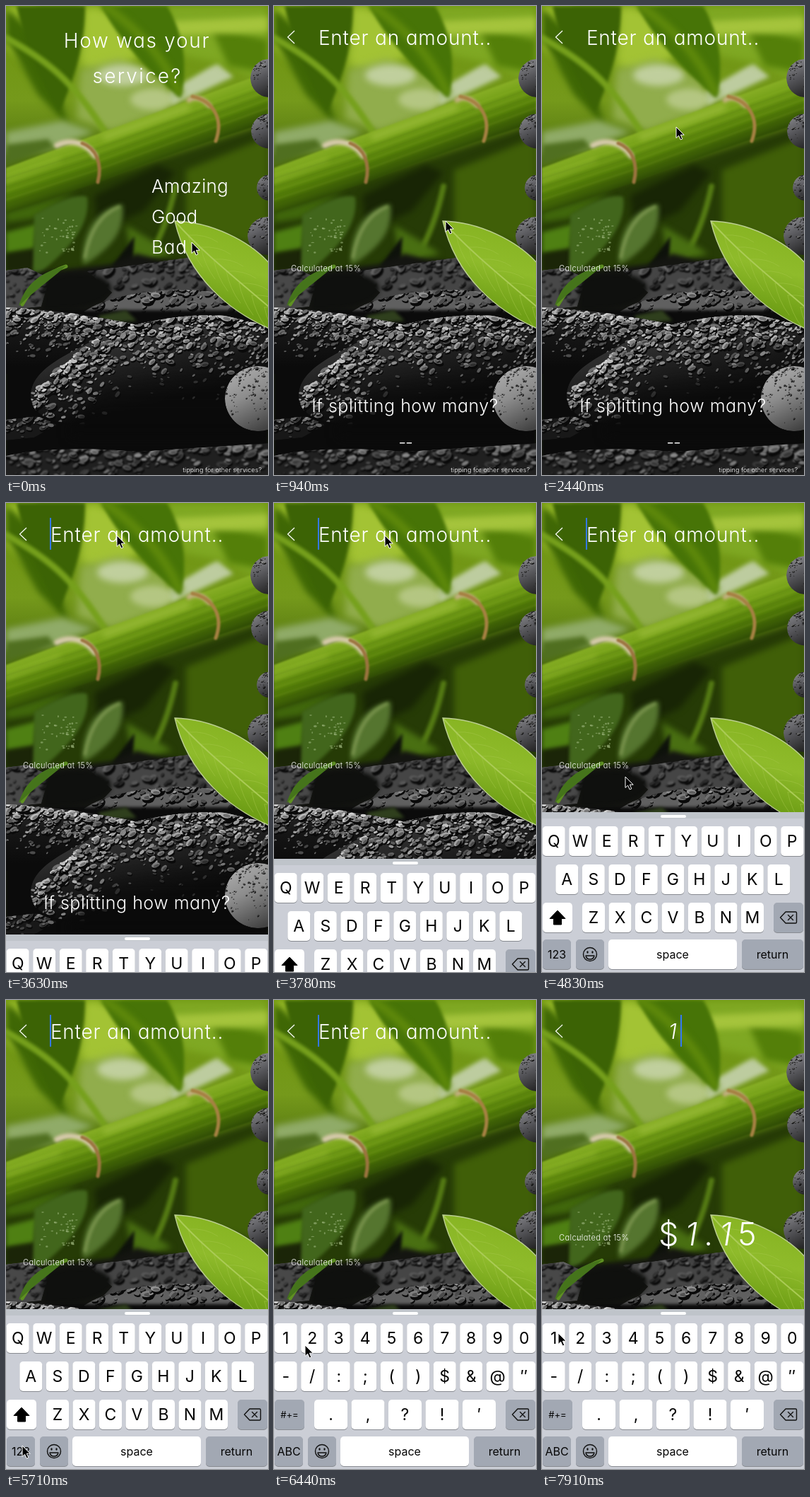
These frames come from a looping animation (371 px wide and 663 px high, 8000 ms). An HTML page with a canvas:

```html
<!DOCTYPE html>
<html lang="en">
<head>
<meta charset="utf-8">
<title>Tip calculator</title>
<style>
html, body { margin: 0; width: 100%; height: 100%; overflow: hidden; background: #0b0b0b; }
canvas, svg { position: absolute; left: 0; top: 0; width: 371px; height: 663px; }
text { font-family: Inter, "Open Sans", sans-serif; white-space: pre; }
.ui { fill: #fff; font-weight: 300; font-feature-settings: "cv11"; }
.key { fill: #050505; text-anchor: middle; }
</style>
</head>
<body>
<canvas id="photo" width="371" height="663"></canvas>
<svg id="stage" viewBox="0 0 371 663"></svg>
<script>
const W = 371, H = 663, LOOP = 8000;

/* ---------- backdrop ---------- */
const ctx = document.getElementById('photo').getContext('2d');
let seed = 7;
const rnd = (a = 0, b = 1) => {
  seed = (seed * 16807) % 2147483647;
  return a + (b - a) * seed / 2147483647;
};

function fade(x0, y0, x1, y1, ...colors) {
  const g = ctx.createLinearGradient(x0, y0, x1, y1);
  colors.forEach((c, i) => g.addColorStop(i / (colors.length - 1), c));
  return g;
}
function shape(fill, d, blur = 0) {
  ctx.filter = blur ? `blur(${blur}px)` : 'none';
  ctx.fillStyle = fill;
  ctx.fill(new Path2D(d));
  ctx.filter = 'none';
}
function line(color, width, d, blur = 0) {
  ctx.filter = blur ? `blur(${blur}px)` : 'none';
  ctx.strokeStyle = color;
  ctx.lineWidth = width;
  ctx.lineCap = 'round';
  ctx.stroke(new Path2D(d));
  ctx.filter = 'none';
}
const disc = (x, y, rx, ry = rx) =>
  `M${x - rx} ${y}a${rx} ${ry} 0 1 0 ${2 * rx} 0a${rx} ${ry} 0 1 0 ${-2 * rx} 0Z`;

function blob(v, x, y, rx, ry, angle) {
  ctx.fillStyle = `rgb(${v},${v},${v})`;
  ctx.beginPath();
  ctx.ellipse(x, y, rx, ry, angle, 0, 7);
  ctx.fill();
}

// Wet stone: drops start at the crest and get smaller, rarer and darker below it.
function stone(fill, d, { from, to, crest, depth, count, size, bright, soft = 0 }) {
  ctx.save();
  ctx.clip(new Path2D(d));
  shape(fill, d);
  if (soft) ctx.filter = `blur(${soft}px)`;
  for (let i = 0; i < count; i++) {
    const k = rnd() * rnd(), x = rnd(from, to), y = crest(x) + k * depth;
    const r = size * (.25 + .75 * rnd() * rnd()) * (1 - k * .4);
    const v = bright * (1 - k * .65) * rnd(.45, 1), angle = rnd(-1, .3);
    blob(10, x + r * .3, y + r * .55, r * 1.25, r * .75, angle);
    blob(v, x, y, r * 1.2, r * .65, angle);
    if (r > size * .5) blob(v * .65, x + r * .2, y + r * .15, r * .8, r * .35, angle);
  }
  ctx.restore();
}

function foliage() {
  ctx.fillStyle = fade(0, 0, 0, 400, '#6d930d', '#75991b', '#3b5a08', '#1b2d06');
  ctx.fillRect(0, 0, W, H);
  shape('#95b827', 'M0 0H40L75 55L45 100L0 60Z', 5);
  shape('#3f6705', 'M0 5C45 35 70 85 88 170L45 125L0 45Z', 4);
  shape('#a3c334', 'M108 0H160L195 65L150 100L104 85Z', 7);
  shape('#91ad4c', 'M105 90L160 75L230 105L225 150L150 178L100 160Z', 6);
  shape('#c0cf9d', disc(165, 98, 36, 15), 5);
  shape('#b4c682', disc(208, 132, 32, 15), 4);
  shape('#bdcc9f', 'M232 120L300 80L322 100L275 122L235 140Z', 3);
  shape('#7fa823', 'M225 0H371V110L300 80L250 70Z', 6);
  shape('#547f09', 'M290 30L371 48V95L315 85Z', 5);
  shape('#a5c43c', 'M228 22L371 15V36L232 42Z', 4);
  shape('#3c6305', 'M15 0H112C112 55 97 105 75 150C48 105 28 60 15 0Z', 2);
  shape('#477407', 'M135 0H228C252 40 258 85 247 130C205 95 160 50 135 0Z', 2);
  line('#5f890b', 12, 'M140 0C190 35 225 75 245 122', 4);
  line('#76a01c', 9, 'M0 45C55 75 95 105 140 178', 2);
  shape('#90ab68', 'M0 178L80 162L125 178L60 203L0 208Z', 5);
  shape('#506f20', 'M0 196L60 188L68 200L0 225Z', 3);

  shape('#263b06', 'M0 290L371 165V380H0Z', 5);
  shape('#405f08', 'M255 232L371 185V345L255 310Z', 5);
  shape('#182505', 'M125 268L215 225L240 235L195 290L130 320Z', 5);
  shape('#41680c', 'M0 292L100 262L40 300L0 306Z', 4);
  shape('#4f8013', 'M0 320L45 308L40 345L0 350Z', 3);
  shape('#1b2508', 'M0 350L45 342L40 375H0Z', 3);
  shape('#42661c', 'M40 295C75 275 100 265 115 270C120 310 90 345 38 385Z', 2);
  shape('#55752f', 'M108 358C110 310 135 285 165 280C170 320 145 345 110 366Z', 3);
  line('#7f9852', 4, 'M112 355C120 310 140 292 160 284', 2);
  for (let i = 0; i < 45; i++)
    shape('rgba(165,190,135,.55)', disc(rnd(48, 100), rnd(300, 350), rnd(.8, 2.5), rnd(.6, 1.6)));
  line('#557b14', 8, 'M205 350C220 325 232 292 240 255', 2);
  shape('#496f12', 'M170 310L212 335L235 350L180 365Z', 4);
  shape('#0e120b', 'M150 368L182 325L178 375Z', 2);

  const top = 'M0 229L75 201L371 93V165C290 190 210 218 130 249L0 292Z';
  shape(fade(150, 160, 176, 232, '#95b72f', '#78a31a', '#557f09', '#304d05'), top, 1);
  line('#a7c545', 5, 'M140 186L258 144', 4);
  line('#90b62d', 5, 'M0 245L75 217', 4);
  for (let i = 0; i < 8; i++)
    line(i % 2 ? 'rgba(50,80,0,.2)' : 'rgba(165,195,55,.18)', 1.5,
      `M0 ${238 + i * 6}L128 ${196 + i * 6}L371 ${108 + i * 6}`, 1);
  line('#d6caab', 8, 'M72 197C95 186 116 196 126 212', 2);
  line('#9c7440', 5, 'M108 194C127 201 137 222 130 249', 1);
  line('#c4b083', 7, 'M259 133C270 126 281 133 288 141', 2);
  line('#a68143', 5, 'M264 128C292 134 309 158 297 191', 1);
}

function rocks() {
  shape('#141511', 'M0 382L150 365L185 350L215 358L371 375V663H0Z', 3);
  stone('#484848', 'M0 374L30 370L62 385L50 425L0 430Z',
    { from: 0, to: 60, crest: () => 372, depth: 60, count: 60, size: 7, bright: 140, soft: 1 });
  stone('#454545', 'M115 375L215 362L262 355L310 372L371 400V448H110L150 405Z',
    { from: 115, to: 371, crest: () => 358, depth: 90, count: 190, size: 9, bright: 125, soft: 1 });
  stone('#606060', 'M110 432C150 405 240 395 300 405L355 435L300 446H130Z',
    { from: 110, to: 355, crest: () => 400, depth: 48, count: 150, size: 9, bright: 175, soft: .7 });
  shape('#0f100e', 'M55 388C90 372 140 376 148 395S115 432 52 428Z', 3);
  line('#5f9022', 5, 'M85 368C60 376 40 392 23 422', .7);
  shape('#45741b', 'M18 424C28 392 50 376 85 367C65 386 48 396 18 424Z');

  shape('#0b0b0b', 'M0 430H371V663H0Z', 2);
  shape('#2f3f1d', 'M130 438L170 430L185 445L140 448Z', 2);
  stone(fade(0, 425, 0, 510, '#2b2b2b', '#151515', '#0b0b0b'),
    'M0 426C60 428 130 438 190 452L185 500L60 530L0 520Z',
    { from: 0, to: 190, crest: x => 426 + x * .12, depth: 85, count: 480, size: 7, bright: 225 });
  const bulge = x => 438 + 112 * Math.max(0, 1 - (x - 35) / 170) ** 1.5;
  stone(fade(190, 440, 220, 560, '#3c3c3c', '#202020', '#0b0b0b'),
    'M35 552C34 520 70 500 110 480C170 446 250 434 310 438L371 452V545C290 575 180 598 90 590C55 586 36 574 35 552Z',
    { from: 35, to: 371, crest: bulge, depth: 125, count: 850, size: 8, bright: 225 });
  shape(fade(0, 490, 0, 600, 'rgba(10,10,10,0)', 'rgba(10,10,10,.9)'),
    'M90 595L140 535L371 500V610H90Z', 8);
  stone('#181818', 'M0 585L45 580L72 592L40 610L0 614Z',
    { from: 0, to: 70, crest: () => 582, depth: 30, count: 50, size: 8, bright: 150, soft: .7 });
  stone('#202020', 'M0 636C60 622 130 626 190 630L371 618V663H0Z',
    { from: 0, to: 371, crest: () => 622, depth: 70, count: 260, size: 10, bright: 160, soft: 1 });

  const ball = (x, y, rx, ry, ...tones) =>
    stone(fade(x - rx, y - ry, x, y + ry, ...tones), disc(x, y, rx, ry),
      { from: x - rx, to: x + rx, crest: () => y - ry, depth: 2 * ry, count: rx * 4, size: 2.6, bright: 185 });
  const dark = ['#929296', '#56565a', '#222'];
  ball(372, 102, 26, 27, ...dark);
  ball(374, 177, 27, 25, ...dark);
  ball(372, 257, 17, 18, ...dark);
  ball(370, 325, 28, 27, ...dark);
  ball(357, 555, 47, 46, '#b5b5b5', '#8c8c8c', '#444');
}

function leaf() {
  const d = 'M239 304C290 305 345 332 373 364V456C318 432 258 385 239 304Z';
  shape(fade(320, 310, 290, 420, '#86b321', '#8fbb2b', '#6f9f16'), d);
  ctx.save();
  ctx.clip(new Path2D(d));
  for (let i = 0; i < 7; i++) {
    const x = 258 + i * 18, y = 324 + i * 17;
    line('rgba(165,200,75,.5)', 1, `M${x} ${y}q25 -2 42 10M${x} ${y}q5 25 20 45`, .5);
  }
  line('#aacb55', 2, 'M240 305C275 345 325 385 373 426');
  ctx.restore();
  line('#bccf91', 1.4, d);
}

foliage();
rocks();
leaf();

/* ---------- interface ---------- */
const stage = document.getElementById('stage');
function add(parent, tag, attrs = {}, content = '') {
  const el = document.createElementNS('http://www.w3.org/2000/svg', tag);
  for (const k in attrs) el.setAttribute(k, attrs[k]);
  el.textContent = content;
  return parent.appendChild(el);
}
const group = parent => add(parent, 'g');
const label = (parent, str, x, y, size, gap = 0, anchor = 'start') => add(parent, 'text', {
  class: 'ui', x, y, 'font-size': size, 'letter-spacing': gap, 'text-anchor': anchor
}, str);

const ask = group(stage);
label(ask, 'How was your', 185.5, 59, 28, 1.7, 'middle');
label(ask, 'service?', 186, 109, 28, 2.2, 'middle');
label(ask, 'Amazing', 206, 264, 26, .3);
label(ask, 'Good', 206, 307, 26, -.2);
label(ask, 'Bad', 206, 350, 26, .8);

label(stage, 'tipping for other services?', 362, 659, 9, .1, 'end');

const form = group(stage);
add(form, 'path', { d: 'M29 35L19.5 44L29 53', fill: 'none', stroke: '#fff', 'stroke-width': 1.2 });
const hint = label(form, 'Enter an amount..', 185.5, 55, 28, .8, 'middle');
const typed = label(form, '1', 179, 55, 30);
typed.setAttribute('font-style', 'italic');
const rate = label(form, 'Calculated at 15%', 24, 375, 11, .4);
const total = label(form, '', 165, 347, 45, 9);
for (const ch of '$1.15')
  add(total, 'tspan', { 'font-style': ch === '1' ? 'italic' : 'normal' }, ch);
label(form, 'If splitting how many?', 185.5, 574, 25, .5, 'middle');
label(form, '--', 186, 625, 24, -1, 'middle');
const caret = add(form, 'rect', { y: 21, width: 2, height: 45, fill: '#3478f6' });

/* keyboard, laid out from its own top edge */
const board = group(stage);
add(board, 'rect', { width: W, height: 300, fill: '#cbced6' });
add(board, 'rect', { width: W, height: 9, fill: '#bfc4ca' });
add(board, 'rect', { x: 168, y: 4, width: 36, height: 4, rx: 2, fill: '#fff' });

function key(parent, x, y, w, str, size = 23, dark = false) {
  add(parent, 'rect', { x, y: y + 1, width: w, height: 42, rx: 5, fill: '#888b91' });
  add(parent, 'rect', { x, y, width: w, height: 42, rx: 5, fill: dark ? '#a2a8b3' : '#fff' });
  add(parent, 'text', { class: 'key', x: x + w / 2, y: y + 21 + size * .36, 'font-size': size }, str);
}
function row(parent, chars, x, y, w = 32, pitch = 37.5) {
  [...chars].forEach((c, i) => key(parent, x + i * pitch, y, w, c));
}
const ROWS = [20, 74, 128, 180];

const letters = group(board);
row(letters, 'QWERTYUIOP', .7, ROWS[0]);
row(letters, 'ASDFGHJKL', 19.3, ROWS[1]);
key(letters, 1, ROWS[2], 42, '');
add(letters, 'path', { d: 'M22 139L33 150.500H27.500V159H16.500V150.500H11Z', 'stroke-linejoin': 'round', stroke: '#000' });
row(letters, 'ZXCVBNM', 57, ROWS[2]);
key(letters, 1, ROWS[3], 40, '123', 16, true);

const digits = group(board);
row(digits, '1234567890', .7, ROWS[0]);
row(digits, '-/:;()$&@″', .7, ROWS[1]);
key(digits, 1, ROWS[2], 42, '#+=', 13, true);
row(digits, '.,?!′', 57, ROWS[2], 47, 52.5);
key(digits, 1, ROWS[3], 40, 'ABC', 16, true);

key(board, 328, ROWS[2], 42, '', 16, true);
const ink = { fill: 'none', stroke: '#111', 'stroke-width': 1.4, 'stroke-linejoin': 'round', 'stroke-linecap': 'round' };
add(board, 'path', { ...ink, d: 'M337.500 149L345 141H359Q360.500 141 360.500 142.500V155.500Q360.500 157 359 157H345ZM348.500 145.500L355.500 152.500M355.500 145.500L348.500 152.500' });
key(board, 48, ROWS[3], 40, '', 16, true);
add(board, 'path', { ...ink, d: disc(68, 201, 9.5) });
add(board, 'path', { ...ink, d: 'M62 203H74Q73 208 68 208T62 203Z' });
add(board, 'path', { d: disc(64.500, 198, 1.2, 1.8) + disc(71.500, 198, 1.2, 1.8), fill: '#111' });
key(board, 94, ROWS[3], 182, 'space', 16);
key(board, 283, ROWS[3], 87, 'return', 16, true);

const pointer = add(stage, 'path', {
  d: 'M0 0V15.500L3.600 12.200L6.200 18L8.800 16.900L6.300 11.200H11.200Z',
  fill: '#000', stroke: '#fff', 'stroke-width': 1
});

/* ---------- timeline: each entry holds until the next ---------- */
const tracks = {
  form: [[0, 0], [500, .25], [650, .6], [800, .9], [940, 1]],
  board: [[0, H], [3630, 610], [3780, 503], [3930, 450], [4080, 439], [4230, 438], [4380, 437]],
  digits: [[0, 0], [5860, 1]],
  caret: [[0, 0], [3630, 1], [4980, 0], [5430, 1], [5860, 0], [6300, 1], [6740, 0], [7170, 1]],
  typed: [[0, 0], [7320, 1]],
  rate: [[0, 375], [7470, 365], [7620, 350], [7760, 342], [7910, 340]],
  total: [[0, 0], [7470, .25], [7620, .6], [7760, .9], [7910, 1]],
  pointer: [
    [0, 263, 334], [500, 260, 330], [650, 252, 318], [800, 246, 308], [940, 243, 304],
    [2440, 190, 171], [2590, 170, 100], [2740, 160, 60], [2890, 157, 46],
    [4680, 145, 190], [4830, 118, 387], [4980, 102, 475], [5130, 82, 540], [5280, 60, 588],
    [5430, 40, 614], [5560, 28, 626], [5710, 23, 630], [5860, 23, 635],
    [6300, 38, 570], [6440, 44, 488], [6590, 29, 474], [6740, 23, 471]
  ]
};
const at = (name, t) => tracks[name].findLast(step => step[0] <= t).slice(1);
const show = (el, amount) => { el.style.opacity = amount; };

function draw(now) {
  const t = now % LOOP;
  const [open] = at('form', t), [top] = at('board', t), [numeric] = at('digits', t);
  const [isTyped] = at('typed', t);
  show(ask, 1 - open);
  show(form, open);
  show(letters, 1 - numeric);
  show(digits, numeric);
  show(hint, 1 - isTyped);
  show(typed, isTyped);
  show(caret, at('caret', t)[0]);
  show(total, at('total', t)[0]);
  caret.setAttribute('x', isTyped ? 196 : 62);
  rate.setAttribute('y', at('rate', t)[0]);
  board.setAttribute('transform', `translate(0 ${top})`);
  pointer.setAttribute('transform', `translate(${at('pointer', t)})`);
}

const start = performance.now();
(function tick() {
  draw(performance.now() - start);
  requestAnimationFrame(tick);
})();
</script>
</body>
</html>
```
